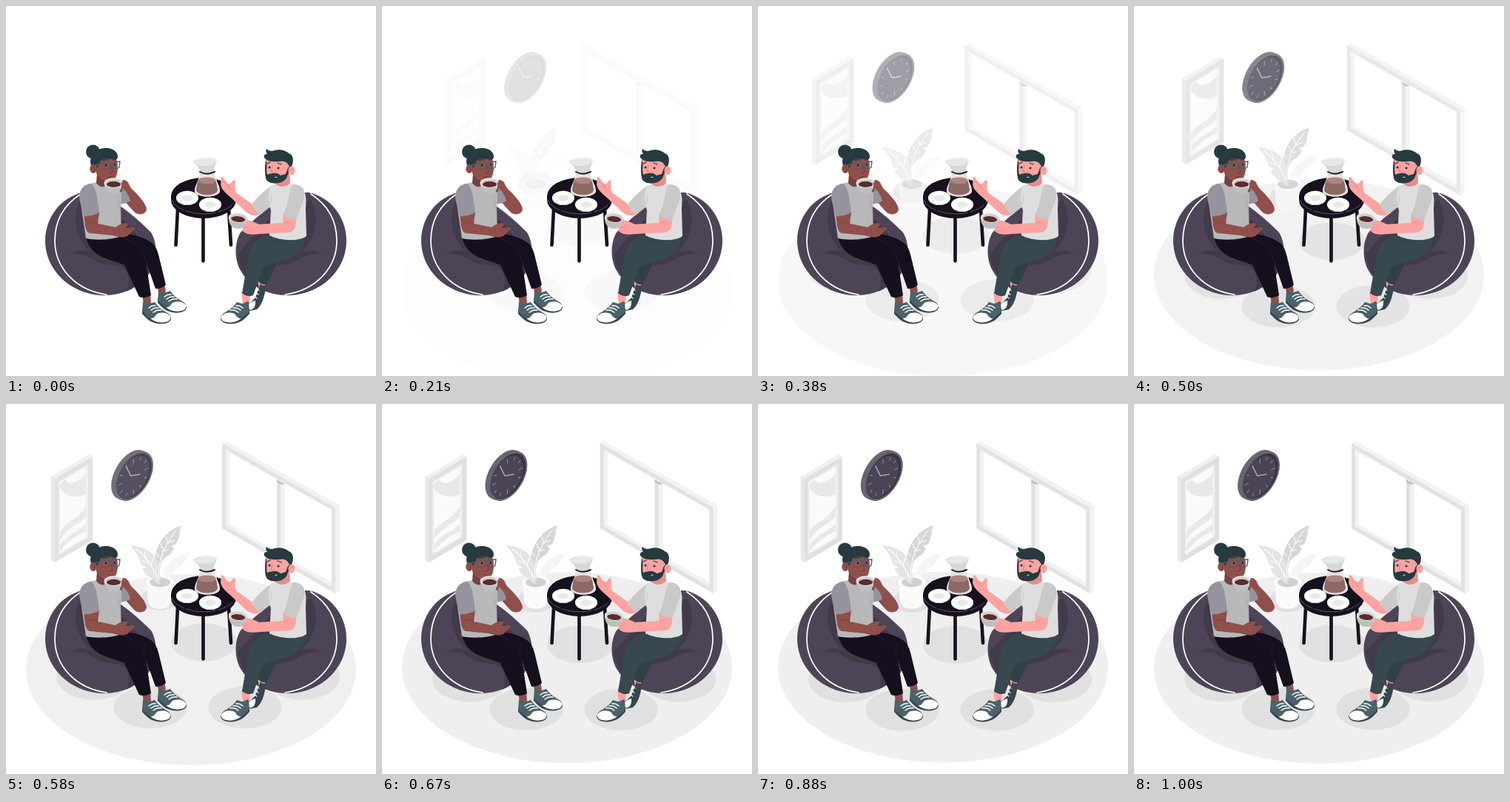
An HTML page for the animation above (1040 ms loop, 500x500 px).

```html
<!DOCTYPE html>
<html lang="en">
<head>
<meta charset="utf-8">
<title>Coffee break</title>
<style>
  html, body { margin: 0; width: 100%; height: 100%; overflow: hidden; background: #fff; }
  svg { display: block; width: 100vw; height: 100vh; }
  .line { fill: none; stroke-linecap: round; stroke-linejoin: round; }
</style>
</head>
<body>
<svg viewBox="0 0 500 500">
  <defs>
    <g id="bean">
      <path fill="#4d4557" d="M104 252C75 258 53 285 53 317C53 359 90 391 133 391C157 391 184 380 197 356C205 340 204 319 196 306C170 280 135 250 104 252Z"/>
      <path fill="#413a4a" d="M101 262C93 276 92 297 99 311C104 322 109 328 114 332C104 329 94 331 84 336C98 333 111 338 122 345C139 354 155 346 163 360C167 368 167 379 162 386C181 379 196 360 200 335L160 290Z"/>
      <path class="line" stroke="#fff" stroke-width="1.7" d="M101 254C78 269 66 291 66 317C66 354 94 384 136 390"/>
    </g>
    <g id="shoe">
      <path fill="#37474f" d="M184 410L184 416C190 422 194 428 207 429.500C216 430 223 427 223 422L218 416Z"/>
      <path fill="#4b626b" d="M185 400C188 397 190 403 195 402L201 400C204 405 210 410 217 414C223 417 224 422 220 425C213 429 203 428 196 423L184 413Z"/>
      <path fill="#fff" d="M203 417C207 414 213 414 218 416C223 418 224 423 219 426C211 429 202 428 195 422C199 423 201 420 203 417Z"/>
      <path class="line" stroke="#fff" stroke-width="1.6" d="M193 408Q198 404 202 405M196 411Q201 407 206 408M199 414Q204 410 210 411"/>
    </g>
    <g id="cup">
      <path fill="#bfbfc0" d="M-13-3C-12 5-8 11 0 11C8 11 12 5 13-3Z"/>
      <ellipse cy="-4" rx="13" ry="6.7" fill="#e6e6e6"/>
      <ellipse cy="-3.5" rx="11" ry="5.300" fill="#cccccc"/>
      <ellipse cy="-2" rx="9.500" ry="3.900" fill="#5b2c2d"/>
    </g>
    <g id="plate">
      <ellipse cy=".8" rx="15" ry="9.3" fill="#d5d5d5"/>
      <ellipse rx="15" ry="9.2" fill="#fff"/>
      <ellipse cy=".5" rx="7.5" ry="4.3" fill="#e9e9e9"/>
    </g>
  </defs>

  <g data-move="0 1">
    <ellipse cx="250" cy="357" rx="223" ry="129" fill="#efefef"/>
  </g>

  <g data-move="1 0">
    <path fill="#f0f0f0" d="M59 98L110 68L115 71V184L64 214L59 211Z"/>
    <path fill="#e8e8e8" d="M59 98L64 101V214L59 211Z"/>
    <path fill="#e0e0e0" d="M64 101L115 71V184L64 214Z"/>
    <path fill="#f0f0f0" d="M69 105L109 81V180L69 204Z"/>
    <path fill="#fafafa" d="M71 106L106 85V180L71 201Z"/>
    <path fill="#e8e8e8" d="M71 108L78 102C82 111 96 107 106 94V122C91 129 77 124 71 114ZM71 172C80 158 94 158 106 138V152C96 164 82 165 71 184ZM71 190C80 176 94 174 106 162V172C93 178 84 183 71 199Z"/>
  </g>

  <g data-move="1 0">
    <g transform="matrix(.866 -.5 0 1 166 95.5)"><circle r="30" fill="#69666f"/></g>
    <g transform="matrix(.866 -.5 0 1 168.5 96.5)"><circle r="30" fill="#69666f"/></g>
    <g transform="matrix(.866 -.5 0 1 171 97.5)">
      <circle r="30" fill="#666270"/>
      <circle r="27.5" fill="#393342"/>
      <circle cx="-2" r="25.700" fill="#4a4456"/>
      <g id="ticks" stroke="#96929c" stroke-width="1.2"></g>
      <path class="line" stroke="#b0adb6" stroke-width="1.4" d="M-12.500-19.500L-5-3L9 2"/>
    </g>
  </g>

  <g data-move="-1 0">
    <path fill="#f2f2f2" fill-rule="evenodd" d="M294 53L299 50L453 137V252L447 256L294 168ZM304 66V163L368 199V102ZM379 108V205L442 241V143Z"/>
    <path fill="#e2e2e2" fill-rule="evenodd" d="M294 53L447 140V256L294 168ZM299 61V165L442 247V143Z"/>
    <path fill="#e0e0e0" d="M368 102L373 105V202L368 199Z"/>
    <path fill="#c4c4c4" d="M368 102L379 108L374 109L368 106Z"/>
  </g>

  <g data-move="0 -1" fill="#e0e0e0">
    <ellipse cx="208" cy="265" rx="25" ry="16"/>
    <ellipse cx="119" cy="371" rx="51" ry="31"/>
    <ellipse cx="400" cy="371" rx="51" ry="31"/>
    <ellipse cx="267.5" cy="324" rx="44.5" ry="25.5"/>
    <ellipse cx="195" cy="412" rx="49.5" ry="28.5"/>
    <ellipse cx="323" cy="412" rx="49.5" ry="28.5"/>
  </g>

  <g data-move="0 0">
    <path fill="#f5f5f5" d="M210 238C213 218 229 203 249 202C241 213 237 220 229 222C231 226 222 230 214 239Z"/>
    <path fill="#fafafa" d="M190 240H226L223 268C220 280 196 280 192 268Z"/>
    <ellipse cx="208" cy="240" rx="18" ry="9" fill="#fff"/>
    <ellipse cx="208" cy="241" rx="14" ry="6.5" fill="#cfcfcf"/>
    <path fill="#d6d6d6" d="M207 242C203 226 198 211 204 196C210 180 222 169 237 164C234 173 235 183 229 190L223 192L227 195C224 204 216 206 211 212C206 220 208 231 210 242Z"/>
    <path fill="#e4e4e4" d="M205 243C201 237 188 233 184 222L190 221L182 217C180 206 175 200 168 191C182 192 197 198 203 209C207 216 205 228 208 243Z"/>
    <path class="line" stroke="#fff" stroke-width="1.1" d="M207 236Q203 204 230 171M207 206L203 201M212 196L209 189M218 186L216 179M211 199L219 197M217 189L227 184M205 236Q195 210 175 195M194 215L185 212M189 208L187 200M196 218L199 208"/>
  </g>

  <use href="#bean"/>
  <use href="#bean" transform="matrix(-1 0 0 1 513 0)"/>

  <!-- table -->
  <g>
    <path class="line" stroke="#16111d" stroke-width="4.6" d="M232 275L229.500 323M301 275L304 323M266.500 284V344.500"/>
    <path fill="#16111d" d="M223 257A44 25 0 0 1 311 257V262A44 25 0 0 1 223 262Z"/>
    <path class="line" stroke="#77717d" stroke-width=".7" stroke-dasharray="22 3 40 4" d="M224 262A44 24 0 0 0 310 262"/>
    <use href="#plate" x="245" y="259"/>
    <use href="#plate" x="276" y="268"/>
    <path fill="#e6e1e1" d="M262 225C261 236 254 244 255 251C258 260 286 260 289 251C290 244 283 236 281 225Z"/>
    <path fill="#8d6865" d="M259 236L257 249C259 257 284 258 286 249L284 236Z"/>
    <ellipse cx="271.500" cy="236" rx="12.500" ry="4.500" fill="#a98581"/>
    <path fill="#d8d8d8" d="M253 210C257 216 262 217 262 224C265 228 278 228 281 224C280 217 285 213 285 208Z"/>
    <path fill="#e8e8e8" d="M252 210C259 204 281 204 285 208C285 214 269 218 259 215C257 214 255 211 252 210Z"/>
    <path class="line" stroke="#211b29" stroke-width="2" d="M262 224Q271 229.500 282 224"/>
    <path class="line" stroke="#eee" stroke-width="1.200" d="M283 230Q284 239 288 245"/>
  </g>

  <!-- woman -->
  <g>
    <path fill="#8f4f4b" d="M204 378L214 374L216 386L207 391ZM184 390L195 387L196 402L186 403Z"/>
    <use href="#shoe" x="21" y="-15"/>
    <use href="#shoe"/>
    <path fill="#160f1d" d="M108 313C130 305 175 305 192 317C202 321 205 330 208 344L216 377Q210 382 202 382L189 345L196 391Q188 396 180 393L160 350C140 341 116 342 108 313Z"/>
    <path class="line" stroke="#2a2132" stroke-width=".8" d="M160 314C175 319 186 327 188 341"/>
    <path fill="#8f4f4b" d="M149 248C155 239 154 235 160 235C168 238 165 244 173 250C180 257 190 268 190 275C188 283 178 283 173 278L156 259Z"/>
    <path fill="#97939e" d="M149 242C159 245 166 254 168 263C165 266 159 267 155 268Z"/>
    <path fill="#b8b7ba" d="M118 239C129 236 144 237 151 242C157 248 157 259 155 273L156 311C144 316 121 317 108 314L101 267C98 250 105 241 118 239Z"/>
    <path class="line" stroke="#9d9ba0" stroke-width=".8" d="M152 263Q151 270 155 277"/>
    <path fill="#783f3c" d="M123 226L138 232V241C133 247 125 244 122 239Z"/>
    <path fill="#8f4f4b" d="M105 282L126 279L124 294L148 299C155 294 161 292 164 294C167 297 160 299 162 300L174 299C176 302 169 305 166 309C161 315 152 312 144 310L114 307C106 306 107 293 105 282Z"/>
    <path class="line" stroke="#783f3c" stroke-width=".7" d="M112 292Q118 291 123 293M160 304L169 302"/>
    <path fill="#97939e" d="M115 240C123 246 124 265 126 279Q116 285 105 284L100 264C97 250 104 241 115 240Z"/>
    <path fill="#8f4f4b" d="M122 207C130 201 146 203 150 209C152 219 151 231 145 235C136 239 126 235 122 226Z"/>
    <circle cx="117.500" cy="197" r="9.500" fill="#263a40"/>
    <path fill="#263a40" d="M114 210C115 196 127 191 138 192C149 194 153 201 150 207C143 208 135 204 128 209C126 213 125 218 122 220C117 220 114 216 114 210Z"/>
    <ellipse cx="118" cy="220" rx="4.800" ry="6" fill="#8f4f4b"/>
    <path class="line" stroke="#713934" stroke-width="1" d="M117 217Q120 219 119 223M142 217L144 225L140 226M138 231Q141 232 144 230"/>
    <path class="line" stroke="#263a40" stroke-width="1.200" d="M131 209Q135 207 138 208M145 208L149 207"/>
    <circle cx="135" cy="215" r="1.300" fill="#1e1e24"/>
    <circle cx="147" cy="214.500" r="1.300" fill="#1e1e24"/>
    <path class="line" stroke="#4a6069" stroke-width="1.400" d="M119 216L128 213M129 212L140 211L140 219Q135 223 130 220ZM140 214L144 213M144 211L154 210L153 218Q148 222 144 219Z"/>
    <use href="#cup" x="145.500" y="243"/>
    <path fill="#8f4f4b" d="M156 239C159 235 162 237 160 241L157 251C153 253 153 249 156 246Z"/>
  </g>

  <!-- man -->
  <g>
    <path fill="#fba3a1" d="M318 387L330 388L329 404L320 402ZM340 370L350 370L350 382L342 382Z"/>
    <path fill="#37474f" d="M344 375C347 380 351 375 351 381C349 394 346 404 339 410L329 412L326 405L337 394Z"/>
    <path fill="#fff" d="M337 398Q338 409 330 411L326 406Q329 400 337 398Z"/>
    <path class="line" stroke="#fff" stroke-width="1.300" d="M340 383L342 384M338 388L341 390M336 393L339 395"/>
    <use href="#shoe" transform="matrix(-1 0 0 1 513 0)"/>
    <path fill="#2f4047" d="M348 335L339 370Q345 378 352 376L366 348Z"/>
    <path fill="#37484f" d="M406 311C392 306 365 304 348 311C335 317 329 326 327 342L319 388Q326 394 334 391L348 352C370 345 401 343 406 311Z"/>
    <path class="line" stroke="#2a3a41" stroke-width=".8" d="M360 309C361 318 341 321 336 336M360 318Q377 321 388 316"/>
    <path fill="#fba3a1" d="M344 281C335 286 328 282 322 276L304 259C296 252 291 248 290 241L291 231C295 231 296 237 300 240C305 242 305 235 309 235C311 240 307 248 312 253L333 268Z"/>
    <path class="line" stroke="#e58884" stroke-width=".7" d="M294 237L302 247M299 241L304 247"/>
    <path fill="#cacaca" d="M359 243C349 249 340 258 332 268Q336 277 344 282L359 269Z"/>
    <path fill="#dedede" d="M359 242C373 238 392 239 400 246C406 252 406 262 405 274L406 311C394 320 367 316 356 310L358 276C354 264 353 252 359 242Z"/>
    <path class="line" stroke="#bdbdbd" stroke-width=".8" d="M357 269Q359 261 358 255"/>
    <path fill="#e88c89" d="M365 237L383 224L384 239C379 245 368 246 364 240Z"/>
    <use href="#cup" x="313.500" y="290" transform="rotate(5 313 290)"/>
    <path class="line" stroke="#c6c6c6" stroke-width="2" d="M324 290C329 287 329 296 322 297"/>
    <path fill="#fba3a1" d="M375 282L392 287C392 297 391 304 384 306L344 308C335 309 325 310 320 304C318 299 321 297 325 294C324 290 329 289 333 291L342 295L374 293Z"/>
    <path class="line" stroke="#e58884" stroke-width=".7" d="M321 300L329 299M323 304L330 303M376 294L382 292"/>
    <path fill="#c9c9c9" d="M390 241C401 242 405 249 403 260L392 290Q382 288 374 283C379 274 381 264 383 254Q385 243 390 241Z"/>
    <path fill="#fba3a1" d="M351 207C358 198 378 199 383 210L380 234C371 241 354 240 351 228Z"/>
    <path fill="#263a40" d="M383 217C380 211 377 209 370 210C362 211 353 210 349 205C348 201 350 200 353 200C351 197 351 195 352 193C355 196 359 197 363 195C371 193 379 196 382 199C389 201 389 210 386 217L382 225L379 233C373 241 357 242 352 235C349 228 350 215 351 208C354 214 351 221 353 228C359 226 366 224 371 229L378 227C380 223 380 219 383 217Z"/>
    <ellipse cx="386" cy="222.500" rx="4.500" ry="6" fill="#fba3a1"/>
    <path class="line" stroke="#e17f7c" stroke-width="1" d="M384 224Q385 219 388 220M360 216L358 224L362 225"/>
    <path class="line" stroke="#263a40" stroke-width="1.300" d="M353 213L357 211M367 212L372 214"/>
    <circle cx="356" cy="218" r="1.500" fill="#263238"/>
    <circle cx="368" cy="219" r="1.500" fill="#263238"/>
    <path fill="#f0a19f" d="M363 231Q365 230 367 231Q365 233.500 363 231Z"/>
  </g>
</svg>
<script>
  const LOOP = 1040, STEPS = 24, TRAVEL = 30;
  const layers = [...document.querySelectorAll("[data-move]")].map(el => ({
    el, dir: el.dataset.move.split(" ").map(Number)
  }));

  document.getElementById("ticks").innerHTML = Array.from({ length: 12 }, (_, i) =>
    `<path d="M0-23.500V-${i % 3 ? 19.5 : 17.5}" transform="translate(-1) rotate(${i * 30})"/>`).join("");

  const stepTimes = Array.from({ length: STEPS + 1 }, (_, i) => Math.round(i * 100 / STEPS) * 10);

  const bezier = (a, b, s) => 3 * (1 - s) ** 2 * s * a + 3 * (1 - s) * s * s * b + s ** 3;

  // Slide-in curve with a slight overshoot, solved by bisection.
  function ease(x) {
    if (x <= 0) return 0;
    if (x >= 1) return 1;
    let lo = 0, hi = 1;
    for (let i = 0; i < 24; i++) {
      const mid = (lo + hi) / 2;
      if (bezier(.36, .5, mid) < x) lo = mid; else hi = mid;
    }
    return bezier(-.01, 1.38, lo);
  }

  function draw(time) {
    const step = stepTimes.filter(t => t <= time).length - 1;
    const y = step < 3 ? 0 : ease(.045 * step - .013);
    const d = TRAVEL * (1 - y);
    for (const { el, dir } of layers) {
      el.setAttribute("opacity", Math.min(1, Math.max(0, y)));
      el.setAttribute("transform", `translate(${dir[0] * d} ${dir[1] * d})`);
    }
  }

  const start = performance.now();
  function tick() {
    draw((performance.now() - start) % LOOP);
    requestAnimationFrame(tick);
  }
  tick();
</script>
</body>
</html>
```
